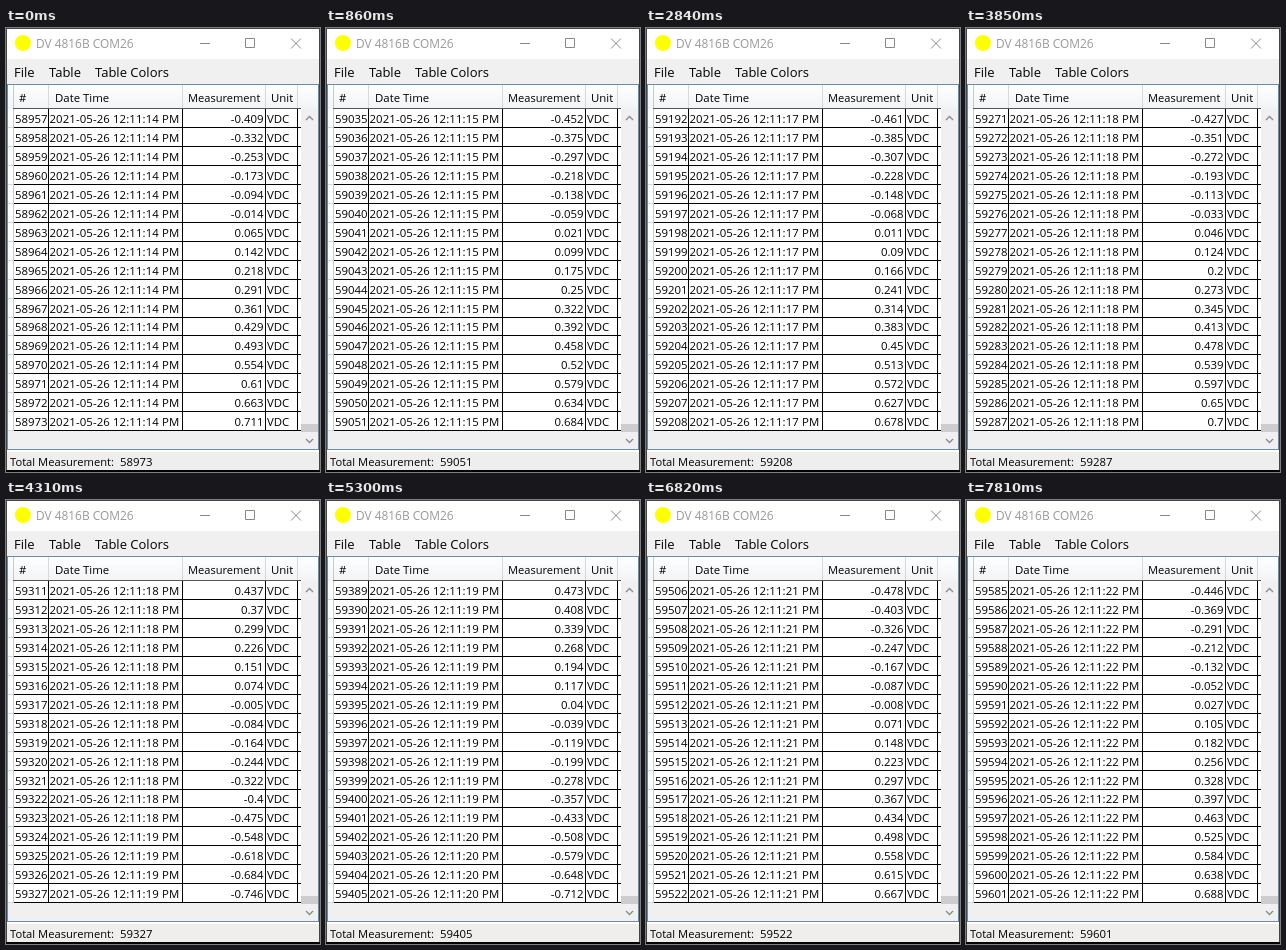
These frames come from a looping animation (314x444 px, 8 s). An HTML page:

```html
<!DOCTYPE html>
<html lang="en">
<head>
<meta charset="utf-8">
<title>Measurement log</title>
<style>
  html, body { margin: 0; width: 100%; height: 100%; overflow: hidden; background: #fff; }
  svg { display: block; }
  text { font-family: "Open Sans", "Noto Sans", sans-serif; white-space: pre; }
</style>
</head>
<body>
<svg id="stage" width="314" height="444" viewBox="0 0 314 444">
  <linearGradient id="header" x2="0" y2="1">
    <stop stop-color="#fff"/><stop offset="1" stop-color="#f1f3f6"/>
  </linearGradient>
</svg>
<script>
const stage = document.getElementById("stage");
const LOOP = 8000, TICK = 66;
const ROWS = 17, PITCH = 18.96, GRID_TOP = 79.96;
const FIRST = 58973;     // last reading when the loop starts
const PERIOD = 78.56;    // readings per second, which is one cycle of the signal
const CYCLE_START = 58962.8, SECOND_START = 59402;

function add(tag, attrs) {
  const el = document.createElementNS("http://www.w3.org/2000/svg", tag);
  for (const key in attrs) el.setAttribute(key, attrs[key]);
  return stage.appendChild(el);
}
const rect = (x, y, width, height, fill) => add("rect", { x, y, width, height, fill });
const path = (d, stroke, width = 1) => add("path", { d, stroke, fill: "none", "stroke-width": width });
function label(x, y, content, size = 11.4, fill = "#000", anchor = "start") {
  const el = add("text", { x, y, "font-size": size, fill, "text-anchor": anchor });
  el.textContent = content;
  return el;
}

// Window frame, title bar and menu
rect(0, 0, 314, 444, "#444");
rect(1, 1, 312, 30, "#fff");
add("circle", { cx: 17, cy: 15, r: 8, fill: "#ffff00" });
label(30, 19.5, "DV 4816B COM26", 11.9, "#999");
path("M194 15.5H204M239.5 10.5h9v9h-9zM285 10.5l10 10m0-10l-10 10", "#888");
rect(1, 31, 312, 25, "#f0f0f0");
label(8, 49, "File", 13);
label(43, 49, "Table", 13);
label(89, 49, "Table Colors", 13);

// Grid and its header
rect(1, 56, 312, 366, "#688caf");
rect(2, 57, 310, 364, "#f0f0f0");
rect(2, 57, 310, 24, "url(#header)");
rect(2, 81, 293, 322, "#fff");
rect(7, 57, 1, 346, "#c9caca");
for (const x of [42, 176, 259, 291]) {
  rect(x, 57, 1, 23, "#d5d9de");
  rect(x, 81, 1, 322, "#000");
}
rect(7, 80, 288, 1, "#555");
label(13, 74, "#");
label(49, 74, "Date Time");
label(182, 74, "Measurement", 11.1);
label(265, 74, "Unit");

// Scroll bar
rect(295, 81, 17, 340, "#f0f0f0");
rect(295, 396, 17, 8, "#cdcdcd");
path("M300 92l3.5-3.5l3.5 3.5M300 411l3.5 3.5l3.5-3.5", "#888", 1.3);

// Status bar
rect(1, 422, 312, 2, "#fff");
rect(1, 424, 312, 18, "#f0eded");
rect(0, 442, 314, 2, "#000");
label(4, 438, "Total Measurement:", 11.2);
const total = label(114, 438, "");

const rows = Array.from({ length: ROWS }, (_, i) => {
  const y = Math.round(GRID_TOP + PITCH * (i + 1));
  rect(2, y, 5, 1, "#d5d9de");
  rect(8, y, 287, 1, "#000");
  label(261, y - 4, "VDC");
  const date = label(43.5, y - 4, "");
  date.setAttribute("letter-spacing", 0.1);
  return { id: label(9, y - 4, ""), date, value: label(257.5, y - 4, "", 11.4, "#000", "end") };
});

// A sine with a little second harmonic, in volts
function voltage(n) {
  const x = 2 * Math.PI * (n - CYCLE_START) / PERIOD;
  return Math.round(980 * (Math.sin(x) + 0.05 * Math.cos(2 * x))) / 1000;
}

// The table refreshes every 7.5 ticks, first at tick 5
const refreshAt = t => 1 + Math.floor((Math.floor(t / TICK) - 5) / 7.5);

// Two refreshes per cycle
const lastReading = k => FIRST + Math.trunc(PERIOD * (k >> 1) - 0.2) + 40 * (k % 2);

function show(last) {
  total.textContent = last;
  rows.forEach((row, i) => {
    const n = last - ROWS + 1 + i;
    const second = 20 + Math.floor((n - SECOND_START) / PERIOD);
    row.id.textContent = n;
    row.date.textContent = `2021-05-26 12:11:${second} PM`;
    row.value.textContent = voltage(n);
  });
}

let shown;
function frame() {
  const last = lastReading(refreshAt(performance.now() % LOOP));
  if (last !== shown) show(shown = last);
  requestAnimationFrame(frame);
}
frame();
</script>
</body>
</html>
```
